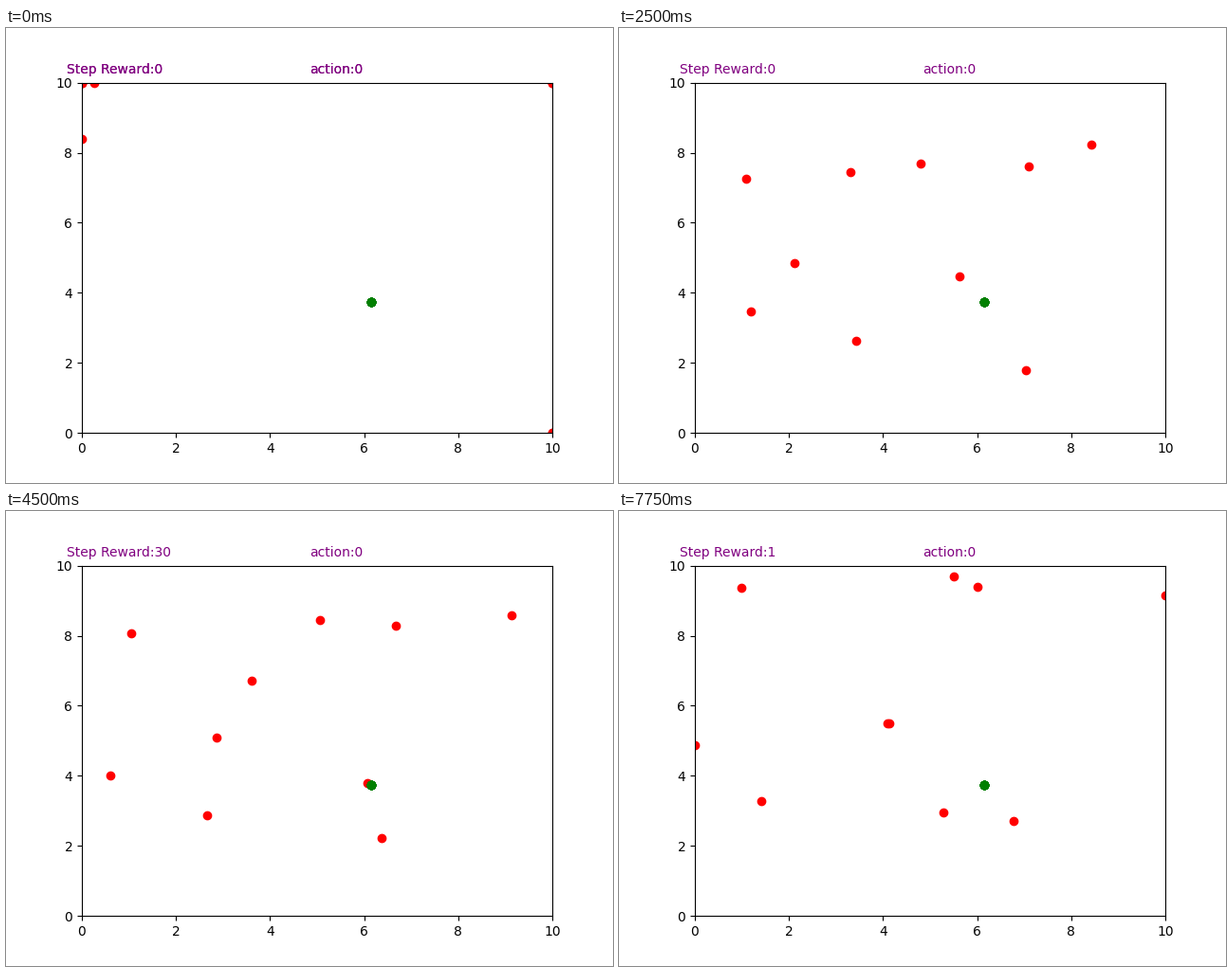
A matplotlib script for the animation above (8000 ms loop, 640 by 480 pixels).

```python
import numpy as np
import matplotlib.pyplot as plt
from matplotlib.animation import FuncAnimation

FRAMES, INTERVAL = 32, 250
EPISODE = 200        # steps until the dots return to their starts
SPEED = 0.1          # data units per step
LIMIT = 10
NEAR, HIT = 0.5, 0.05
AGENT = np.array([6.15, 3.74])

# each dot flies straight: start point and heading in degrees
START = np.array([
    (1.126, 6.260), (2.907, 8.358), (4.464, 6.759), (7.600, 6.736),
    (7.521, 7.789), (1.157, 4.538), (5.082, 5.310), (1.944, 2.805),
    (4.372, 2.338), (7.878, 1.236),
])
ANGLE = np.radians([92.5, -66.9, 70.5, 120.7, 26.3,
                    18.2, -56.8, 138.4, 162.4, 146.6])
HEADING = np.column_stack([np.cos(ANGLE), np.sin(ANGLE)])


def dot_positions(step):
    return np.clip(START + SPEED * step * HEADING, 0, LIMIT)


def closest(step):
    """Smallest distance between agent and dots up to this step."""
    return min(np.hypot(*(dot_positions(s) - AGENT).T).min()
               for s in range(step + 1))


def reward(step):
    gap = closest(step)
    if gap > NEAR:
        return 0
    return 30 if gap > HIT else 1


fig, ax = plt.subplots(figsize=(6.4, 4.8), dpi=100)
ax.set_xlim(0, LIMIT)
ax.set_ylim(0, LIMIT)

dots, = ax.plot([], [], "ro")
# the agent is stamped once per dot, which hardens its edge
ax.plot(*np.tile(AGENT, (len(START), 1)).T, "go")


def label(x, text):
    return fig.text(x, 0.9, text, color="purple", fontsize=10)


reward_text = label(0.1, "")
label(0.5, "action:0")
# labels are drawn twice while the old episode is still on screen
doubles = [label(0.1, "Step Reward:0"), label(0.5, "action:0")]


def update(frame):
    # the loop opens on the last step of the previous episode
    step = (frame - 1) % EPISODE + 1
    dots.set_data(*dot_positions(step).T)
    reward_text.set_text(f"Step Reward:{reward(frame)}")
    for text in doubles:
        text.set_visible(step == EPISODE)
    return [dots, reward_text, *doubles]


anim = FuncAnimation(fig, update, frames=FRAMES, interval=INTERVAL,
                     repeat=True, repeat_delay=0, blit=False)
plt.show()
```
